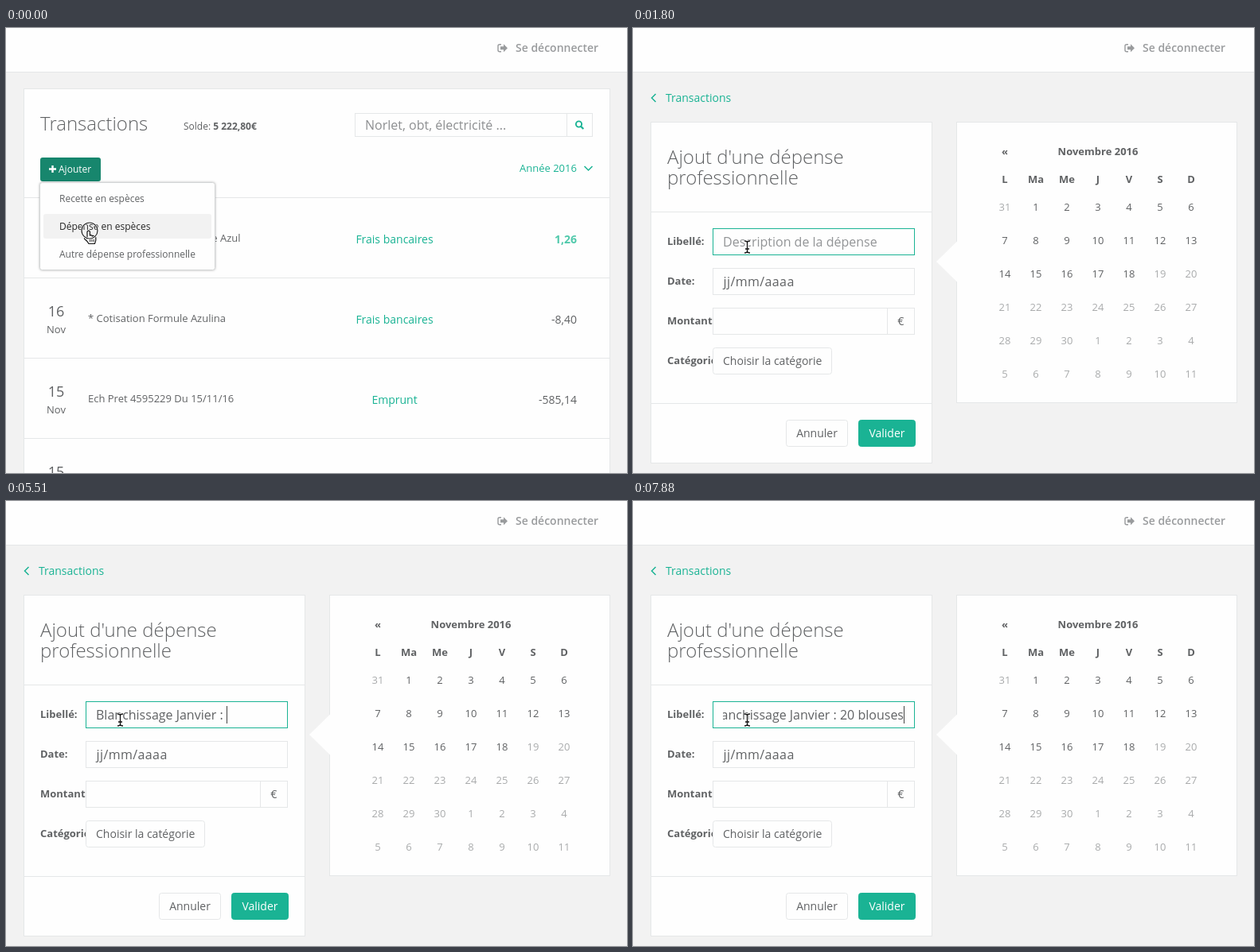
Recreate the animation shown at these times as an HTML page. Size 780x560 px, loop 8 s.

```html
<!DOCTYPE html>
<html lang="fr">
<head>
<meta charset="utf-8">
<title>Ajout d'une dépense</title>
<style>
html, body { margin: 0; width: 780px; height: 560px; overflow: hidden; background: #f2f2f2; }
svg { display: block; }
text { font-family: "Open Sans", sans-serif; white-space: pre; }
</style>
</head>
<body>
<svg id="stage" width="780" height="560"></svg>
<script>
const GREEN = '#1ab394', INK = '#606264', LINE = '#e5e7e8', PALE = '#a9abac', WHITE = '#fefefe';
const LABEL = 'Blanchissage Janvier : 20 blouses';

const text = (x, y, str, size = 13, o = {}) =>
  `<text x="${x}" y="${y}" font-size="${size}" fill="${o.fill || INK}" font-weight="${o.weight || 400}"
    text-anchor="${o.anchor || 'start'}" letter-spacing="${o.gap || 0}" ${o.id ? `id="${o.id}"` : ''}>${str}</text>`;
const mid = { anchor: 'middle' };
const bold = { weight: 700 };
// Box given by its outer pixel edges, with a one-pixel border inside
const box = (x1, y1, x2, y2, r = 0, stroke = LINE, fill = WHITE) =>
  `<rect x="${x1 + .5}" y="${y1 + .5}" width="${x2 - x1 - 1}" height="${y2 - y1 - 1}" rx="${r}" fill="${fill}" stroke="${stroke}"/>`;
const rule = (x1, x2, y) => `<path d="M${x1} ${y + .5}H${x2}" stroke="${LINE}"/>`;
const stroke = (d, width = 1.5, color = GREEN) =>
  `<path d="${d}" fill="none" stroke="${color}" stroke-width="${width}"/>`;

function header() {
  const grey = '#999b9d';
  return `<rect width="780" height="55" fill="${WHITE}"/>` + rule(0, 780, 55) +
    stroke('M622 20.7h-2q-2 0-2 2v5q0 2 2 2h2', 1.4, grey) +
    `<path d="M621 23.2h4v-3l5 5-5 5v-3h-4z" fill="${grey}"/>` +
    text(640, 30, 'Se déconnecter', 14, { weight: 600, fill: grey });
}

function row(i, day, label, category, amount) {
  const y = 213 + 101 * i;
  return rule(23, 758, y) + text(63, y + 49, day, 18, mid) + text(63, y + 70, 'Nov', 13, mid) +
    text(103, y + 56, label) + text(488, y + 58, category, 14, { ...mid, fill: GREEN }) +
    text(717, y + 58, amount, 14, i ? { anchor: 'end' } : { anchor: 'end', weight: 700, fill: '#50c9ab' });
}

function listPage() {
  return box(22, 76, 759, 600) + text(43, 129, 'Transactions', 24, { weight: 300 }) +
    text(223, 128, 'Solde: <tspan font-weight="700">5 222,80€</tspan>', 12) +
    box(438, 107, 705, 137) + box(704, 107, 737, 137) +
    text(451, 128, 'Norlet, obt, électricité ...', 16, { fill: '#8d8f91' }) +
    `<circle cx="719.5" cy="121" r="3.6" fill="none" stroke="${GREEN}" stroke-width="1.9"/>` +
    stroke('M722 123.7l3.3 3.3', 2.2) +
    '<rect id="add" x="43" y="163" width="76" height="30" rx="3"/>' +
    stroke('M54 177.5h9M58.500 173v9', 2.4, '#fff') + text(66, 182, 'Ajouter', 12, { fill: '#fff' }) +
    text(645, 181, 'Année 2016', 13, { fill: GREEN }) + stroke('M726.500 174l5 5 5-5') +
    row(0, '', '', 'Frais bancaires', '1,26') +
    text(294.5, 269, 'Formule Azul', 13, { anchor: 'end' }) +
    row(1, '16', '* Cotisation Formule Azulina', 'Frais bancaires', '-8,40') +
    row(2, '15', 'Ech Pret 4595229 Du 15/11/16', 'Emprunt', '-585,14') +
    row(3, '15', '', '', '') +
    '<g style="filter:drop-shadow(0 0 1.5px #0004)">' + box(42, 194, 263, 305, 3, '#d2d4d5') + '</g>' +
    '<rect id="hover" x="47" width="211" height="31" rx="3" fill="#f2f2f2"/>' +
    ['Recette en espèces', 'Dépense en espèces', 'Autre dépense professionnelle']
      .map((s, i) => text(67, 219 + 35 * i, s, 12, { id: 'item' + i })).join('');
}

function calendar() {
  let out = box(406, 118, 759, 472) + `<path d="M407.500 268l-26.500 26 26.500 26z" fill="${WHITE}"/>` +
    text(467, 160, '«', 13, { ...mid, ...bold }) + text(584, 160, 'Novembre 2016', 13, { ...mid, ...bold });
  ['L', 'Ma', 'Me', 'J', 'V', 'S', 'D'].forEach((d, i) => {
    out += text(467 + 39 * i, 195, d, 13, { ...mid, ...bold });
  });
  for (let i = 0; i < 42; i++) {
    const day = i ? (i - 1) % 30 + 1 : 31;
    out += text(467 + 39 * (i % 7), 230 + 42 * Math.floor(i / 7), day, 13,
      { ...mid, fill: i < 1 || i > 18 ? PALE : INK });
  }
  return out;
}

function formPage() {
  return stroke('M28.500 83l-5 5 5 5') + text(41, 93, 'Transactions', 14, { fill: GREEN }) +
    box(22, 118, 376, 548) + rule(23, 375, 231) + rule(23, 375, 472) +
    text(43, 171, "Ajout d'une dépense", 24, { weight: 300 }) +
    text(43, 197, 'professionnelle', 24, { weight: 300 }) +
    ['Libellé:', 'Date:', 'Montant:', 'Catégorie:'].map((s, i) =>
      `<svg width="${i > 1 ? 103 : 200}" height="560">${text(43, 273 + 50 * i, s, 13, bold)}</svg>`).join('') +
    box(100, 252, 354, 286, 0, GREEN) + box(100, 302, 354, 336) +
    box(100, 352, 320, 386) + box(319, 352, 354, 386) + box(100, 402, 250, 436, 3) +
    text(113, 275, 'Description de la dépense', 16, { fill: '#929496', id: 'hint' }) +
    `<svg x="113" y="253" width="229" height="32">${text(0, 22, '', 16, { id: 'typed' })}</svg>` +
    '<rect id="caret" y="258" width="1" height="22" fill="#444"/>' +
    text(113.500, 325, 'jj/mm/aaaa', 16, { gap: .4 }) + text(336.500, 374, '€', 14, mid) +
    text(113, 424, 'Choisir la catégorie', 14) +
    box(192, 493, 270, 527, 3) + text(231, 515, 'Annuler', 14, mid) +
    box(283, 493, 355, 527, 3, GREEN, GREEN) + text(319, 515, 'Valider', 14, { ...mid, fill: '#fff' }) +
    calendar();
}

const beam = 'M-3.500-7.500Q0-7.500 0-5.500Q0-7.500 3.500-7.500M0-5.500V6M-2.500 2.500H2.500M-3.500 7.500Q0 7.500 0 5.500Q0 7.500 3.500 7.500';
const hand = 'M-3 11V2Q-3 .2-1.300 .2T.4 2V6.500Q1.200 5 2.800 5.900L3.200 7Q4.500 5.800 5.600 7L5.900 8Q7.600 7.200 7.800 9V12Q7.400 14 6.400 16.500H-1Q-3 13-6.300 10.500Q-7 8.700-5.300 8.600T-3 11Z';

const stage = document.getElementById('stage');
stage.innerHTML = header() + `<g id="list">${listPage()}</g><g id="form">${formPage()}</g>` +
  `<g id="pointer">
    <g id="hand"><path d="${hand}" fill="#fff" stroke="#111" stroke-width="1.200"/>
      ${stroke('M.6 11v3M2.900 11v3M5.200 11v3', .9, '#111')}</g>
    <g id="beam">${stroke(beam, 3, '#fff')}${stroke(beam, 1.300, '#111')}</g>
    <g id="ring" fill="none"><circle r="10" stroke="#fff" stroke-width="2.400"/><circle r="10" stroke="#222" stroke-width="1.200"/></g>
  </g>`;
const $ = id => document.getElementById(id);
const show = (id, on) => $(id).setAttribute('display', on ? 'inline' : 'none');
const set = (id, name, value) => $(id).setAttribute(name, value);

// Pointer stops: time, x, y
const stops = [[0, 105, 255], [150, 107, 263], [300, 110, 274], [450, 112, 283], [600, 112.5, 283],
  [750, 111.5, 284.5], [1350, 127, 280], [1500, 143.5, 275.5]];
// Typing bursts: start time, then the letter count after each keystroke
const bursts = [[2250, 1, 2, 3, 4, 6, 7, 8, 9], [3430, 11, 12], [3880, 14, 15, 16, 17, 18, 20, 21],
  [5060, 22], [5510, 23], [6550, 24, 25, 26, 27, 28, 29, 30, 31], [7733, 32, 33]];
const KEY = 147;

function typedCount(t) {
  const burst = bursts.findLast(b => t >= b[0]);
  if (!burst) return 0;
  const [start, ...counts] = burst;
  return counts[Math.min(counts.length - 1, Math.floor((t - start) / KEY))];
}

function draw(t) {
  const onList = t < 750;
  show('list', onList);
  show('form', !onList);

  const [, x, y] = stops.findLast(s => t >= s[0]);
  set('pointer', 'transform', `translate(${x} ${y})`);
  show('hand', t < 600);
  show('beam', t >= 600);
  show('ring', onList);

  const item = y < 267 ? 1 : 2;
  set('add', 'fill', t < 150 ? '#17866d' : '#18a689');
  set('hover', 'y', 199 + 35 * item);
  for (let i = 0; i < 3; i++) set('item' + i, 'fill', i === item ? '#262626' : INK);

  const count = typedCount(t);
  show('hint', !count);
  $('typed').textContent = LABEL.slice(0, count);
  const width = count && !onList ? $('typed').getComputedTextLength() : 0;
  const shift = Math.min(0, 227 - width);
  set('typed', 'x', shift);
  set('caret', 'x', Math.round(113 + width + shift));
  show('caret', !(t >= 1800 && t < 2250 || t >= 6100 && t < 6550));
}

const begin = performance.now();
function tick() {
  draw((performance.now() - begin) % 8000);
  requestAnimationFrame(tick);
}
tick();
</script>
</body>
</html>
```
